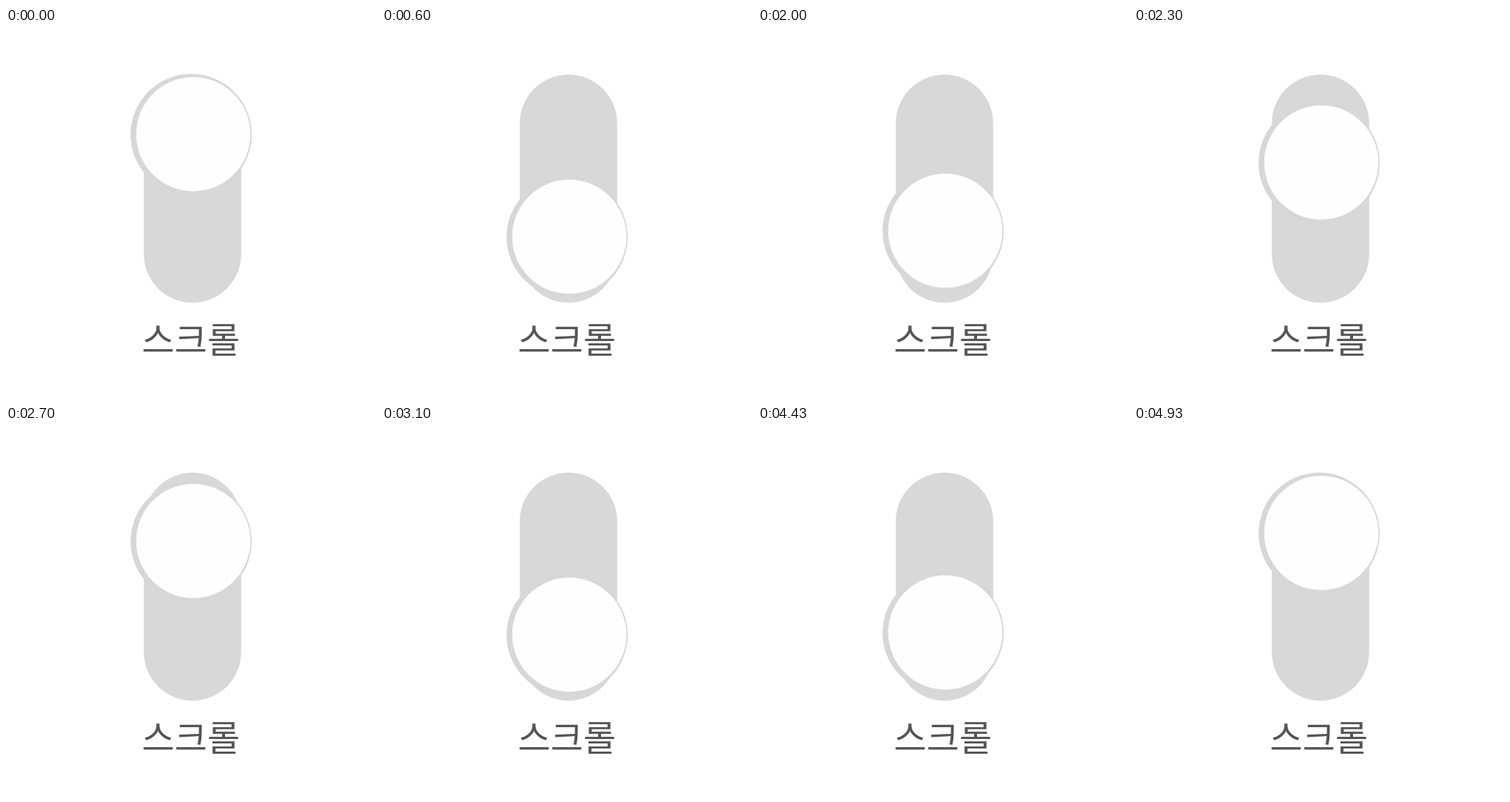
Recreate the animation shown at these times as an HTML page with a canvas. Size 500 by 500 pixels, loop 5010 ms.

```html
<!DOCTYPE html>
<html lang="ko">
<head>
<meta charset="utf-8">
<title>스크롤</title>
<style>
html, body { margin: 0; width: 100%; height: 100%; overflow: hidden; background: #fff; }
canvas { display: block; width: 500px; height: 500px; }
</style>
</head>
<body>
<canvas id="stage" width="500" height="500"></canvas>
<script>
const ctx = document.getElementById('stage').getContext('2d');
const LOOP = 5010;
const TOP = 143.5, BOTTOM = 294.5;

// Timing curve with handles (x1, 0) and (x2, 1)
function ease(u, x1, x2) {
  let lo = 0, hi = 1;
  for (let i = 0; i < 30; i++) {
    const s = (lo + hi) / 2, r = 1 - s;
    const x = 3 * r * r * s * x1 + 3 * r * s * s * x2 + s * s * s;
    if (x < u) lo = s; else hi = s;
  }
  return lo * lo * (3 - 2 * lo);
}

// Twenty steps a second, alternating 30 and 70 ms
function stepAt(t) {
  return Math.min(99, 2 * Math.floor(t / 100) + (t % 100 >= 30 ? 1 : 0));
}

// Down for 1 s, rest for 0.5 s, up for 1 s
function knobY(step) {
  const k = step % 50;
  let p = 1;
  if (k < 20) p = ease(k / 20, 0.55, 0);
  else if (k > 30) p = 1 - ease((k - 30) / 20, 1, 0.63);
  return TOP + (BOTTOM - TOP) * p;
}

function disc(x, y, r, color) {
  ctx.fillStyle = color;
  ctx.beginPath();
  ctx.arc(x, y, r, 0, Math.PI * 2);
  ctx.fill();
}

function track() {
  ctx.fillStyle = '#d8d8d8';
  ctx.beginPath();
  ctx.arc(252, 128.8, 65.8, Math.PI, 0);
  ctx.arc(252, 305.4, 65.8, 0, Math.PI);
  ctx.fill();
}

function label() {
  ctx.font = '400 48px "Noto Sans CJK KR", "Noto Sans CJK", "Noto Sans CJK JP", sans-serif';
  ctx.textAlign = 'center';
  ctx.textBaseline = 'alphabetic';
  ctx.fillStyle = '#555';
  ctx.fillText('스크롤', 249.8, 438.5);
}

function draw(t) {
  const y = knobY(stepAt(t));
  ctx.fillStyle = '#fff';
  ctx.fillRect(0, 0, 500, 500);
  track();
  disc(250.2, y + 0.4, 81.9, '#d7d7d7');
  disc(253.1, y, 77.5, '#ececec');
  disc(253.1, y, 76.8, '#fefefe');
  label();
}

const start = performance.now();
function tick() {
  draw((performance.now() - start) % LOOP);
  requestAnimationFrame(tick);
}
tick();
</script>
</body>
</html>
```
